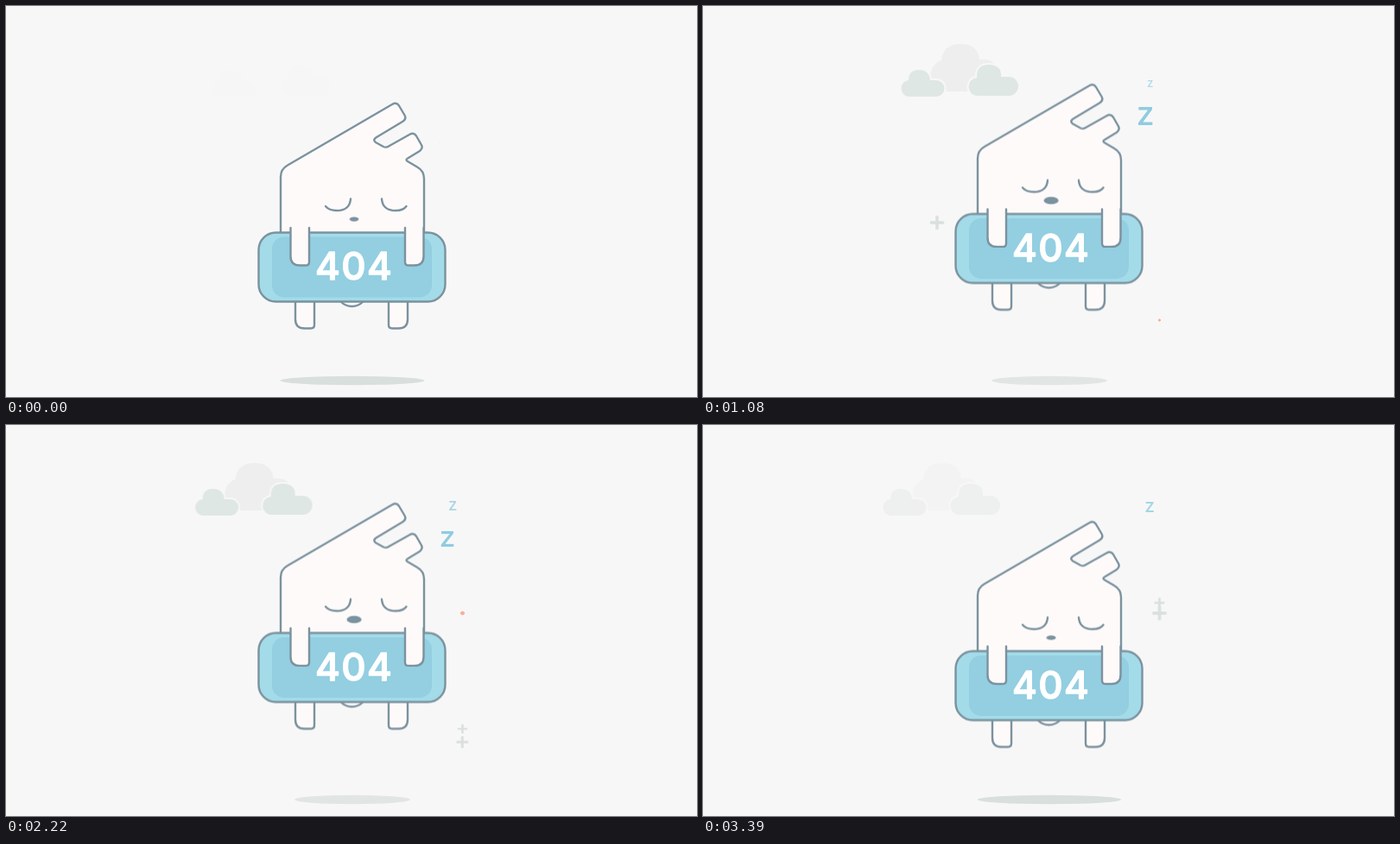
Write an HTML page without scripts that moves like this. It is 800 by 453 pixels and loops after 3.42 s.

```html
<!DOCTYPE html>
<html lang="en">
<head>
<meta charset="utf-8">
<title>404</title>
<style>
  html, body { margin: 0; width: 100%; height: 100%; overflow: hidden; background: #f7f7f7; }
  svg { display: block; width: 100%; height: 100%; }

  .float, .shadow, .nose, .clouds, .late, .z, .dot, .top, .low {
    animation: 3420ms linear infinite both;
  }

  .float { animation-name: float; }
  .ink { fill: #fefaf9; stroke: #7b929f; stroke-width: 2.4; stroke-linecap: round; stroke-linejoin: round; }
  .line { fill: none; }
  .nose { fill: #7b929f; transform-origin: 403px 247px; animation-name: nose; }
  .shadow { fill: #d9dfdd; transform-origin: 401px 434px; animation-name: shadow; }
  .code {
    font: 500 44px Inter, "Open Sans", sans-serif; text-anchor: middle;
    fill: #fff; stroke: #fff; stroke-width: 1.4; stroke-linejoin: round;
  }
  @keyframes float { 47.4% { transform: translateY(-32.4px); } }
  @keyframes nose { 0%, 100% { transform: scale(.52); } 47.4% { transform: none; } }
  @keyframes shadow { 47.4% { transform: scaleX(.7); opacity: .6; } }

  .clouds { animation-name: drift, fade; }
  .front { fill: #dfe7e4; stroke: #f7f7f7; stroke-width: 4; paint-order: stroke; }
  @keyframes drift { from { transform: translateX(9.8px); } to { transform: translateX(-21.3px); } }
  @keyframes fade { 0% { opacity: .05; } 14%, 91% { opacity: 1; } 100% { opacity: .35; } }

  .z {
    font: 500 38.5px Inter, "Open Sans", sans-serif; text-anchor: middle; fill: #8fcce0;
    animation-name: snore; animation-delay: calc(var(--n) * 597ms - 15ms);
  }
  .late { animation-name: late; }
  @keyframes snore {
    0% { transform: translate(501px, 160px) scale(0); }
    15.06% { transform: translate(512.5px, 127px) scale(1); }
    24.65% { transform: translate(515.7px, 106px) scale(1); opacity: 1; }
    35.96%, 100% { transform: translate(518.7px, 81.5px) scale(0); opacity: .5; }
  }
  @keyframes late { 0%, 50% { visibility: hidden; } 50.01%, 100% { visibility: visible; } }

  .dot, .top, .low { animation-delay: calc((var(--birth) + var(--n) * 834) * 1ms); }
  .dot { fill: #f8b09b; animation-name: pop; }
  .plus { fill: none; stroke: #d9e0dd; stroke-width: 3.6; }
  .top { animation-name: top; }
  .low { animation-name: low; }
  @keyframes pop {
    0% { transform: scale(0); }
    5.4% { transform: scale(1); }
    5.41%, 100% { transform: scale(0); }
  }
  @keyframes top {
    0%, 6% { transform: translateY(-12px) scale(0); }
    6.01% { transform: translateY(-12px) scale(.72); }
    8.92% { transform: translateY(-12px) scale(.6); }
    9.27%, 100% { transform: translateY(-12px) scale(0); }
  }
  @keyframes low {
    0%, 5.41% { transform: scale(0); }
    5.42% { transform: scale(.95); }
    6.67% { transform: scale(1); }
    8.92% { transform: translate(-.6px, 8.5px) scale(.54); }
    9.27%, 100% { transform: translate(-.6px, 8.5px) scale(0); }
  }
</style>
</head>
<body>
<svg viewBox="0 0 800 453">
  <defs>
    <g id="burst">
      <circle class="dot" r="7.4"/>
      <path class="plus top" d="M-8.3 0H8.3M0-8.3V8.3"/>
      <path class="plus low" d="M-8.3 0H8.3M0-8.3V8.3"/>
    </g>
    <g id="site">
      <use href="#burst" style="--n:0"/>
      <use href="#burst" style="--n:1"/>
      <use href="#burst" style="--n:2"/>
      <use href="#burst" style="--n:3"/>
    </g>
    <path id="leg" d="M335 340V363Q335 373.5 345.500 373.500H353Q357 373.500 357 369.500V340"/>
    <path id="arm" d="M329.500 257V290Q329.500 300.500 340 300.500H347Q351 300.500 351 296.500V257"/>
  </defs>

  <g class="clouds">
    <path fill="#eee" d="M283 99a18.500 18.500 0 0 1-7-36q2-19 22-19t22 18h5q15 0 15 15v22z"/>
    <path class="front" d="M240 105a9.500 9.500 0 0 1-2-19q0-12 12-12t13 12h7a9.500 9.500 0 0 1 0 19z"/>
    <path class="front" d="M319 104a10.500 10.500 0 0 1-2-21q-1-15 14-15t14 14h9a11 11 0 0 1 0 22z"/>
  </g>

  <ellipse class="shadow" cx="401" cy="434" rx="83.500" ry="5.200"/>

  <g class="float">
    <g class="ink">
      <path d="M387 342Q393 348 400.500 348T414 342"/>
      <use href="#leg"/>
      <use href="#leg" transform="matrix(-1 0 0 1 800 0)"/>
      <path d="M318 270V198Q318 189 326 184.500L447 114Q452 111 455 115.500L461.500 126.500Q464 131 459 134L429 152Q424 155 428 158L437 163Q440 164.500 443 162.500L467 149Q472 146 475 150.500L481 161Q483 165 479 168L465 176.500Q462 178 465 180L476 186.500Q484 191 484 200V270"/>
      <path class="line" d="M370 232Q374 237 383 237Q398 237 399 223.500M435 223.500Q436 237 451 237Q460 237 463.500 232"/>
      <rect x="292.500" y="262.500" width="216" height="80" rx="20" style="fill:#a3dbe9"/>
    </g>
    <ellipse class="nose" cx="403" cy="247" rx="10.200" ry="5.100"/>
    <rect x="308" y="267.500" width="185" height="70" rx="14" fill="#93cee1"/>
    <g class="ink">
      <use href="#arm"/>
      <use href="#arm" transform="matrix(-1 0 0 1 813 0)"/>
    </g>
    <text class="code" x="372.500 402.500 432.500" y="317.500">404</text>
  </g>

  <text class="z" y="10.500" style="--n:0">z</text>
  <text class="z" y="10.500" style="--n:1">z</text>
  <text class="z" y="10.500" style="--n:2">z</text>
  <text class="z" y="10.500" style="--n:3">z</text>
  <g class="late"><text class="z" y="10.500" style="--n:4">z</text></g>

  <use href="#site" x="528.500" y="218" style="--birth:390"/>
  <use href="#site" x="528.500" y="364" style="--birth:192"/>
  <use href="#site" x="271" y="251" style="--birth:36"/>
  <use href="#site" x="321.500" y="395" style="--birth:601"/>
</svg>
</body>
</html>
```
